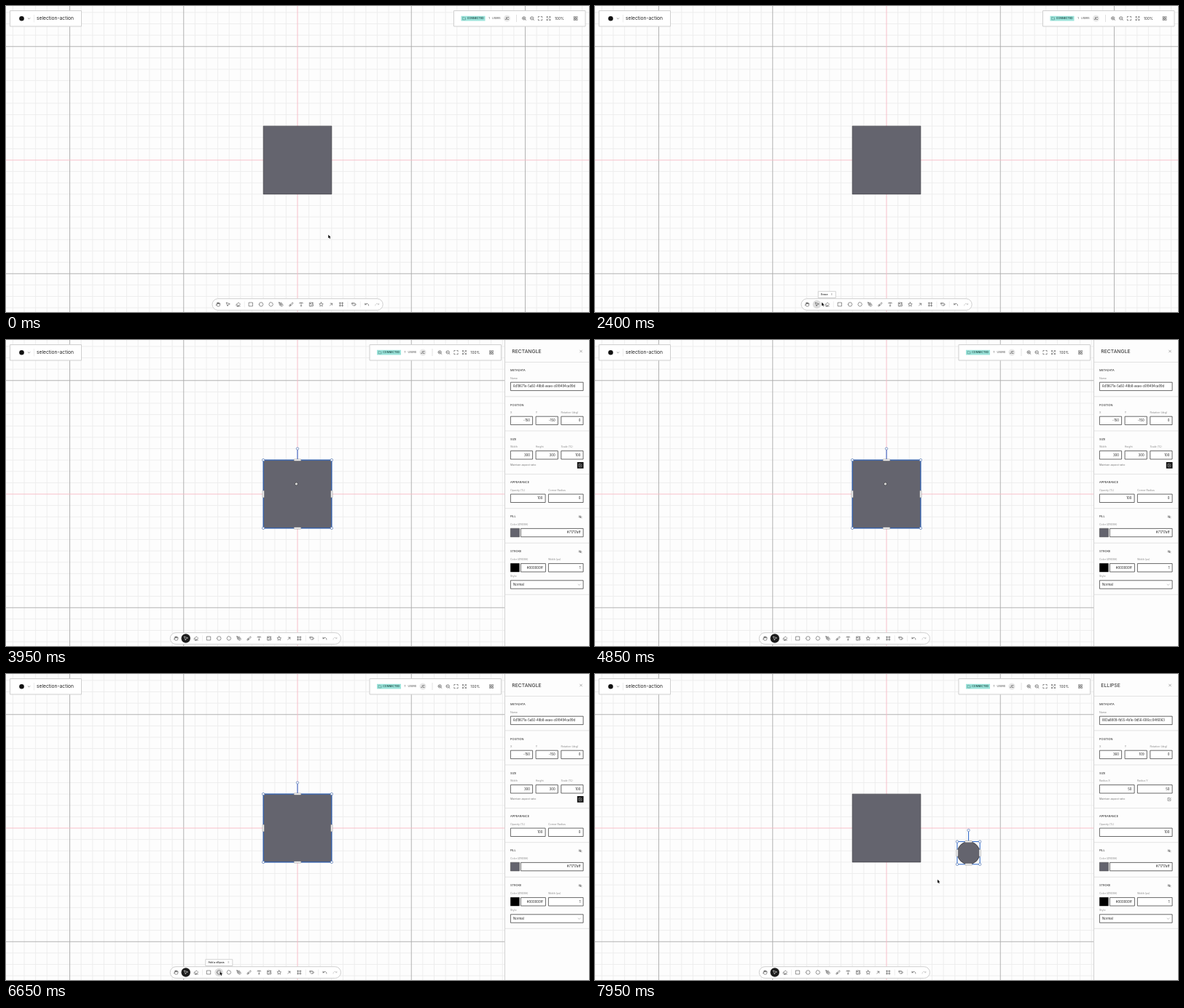
These frames come from a looping animation (800x421 px, 8000 ms). An HTML page with a canvas:

```html
<!DOCTYPE html>
<html lang="en">
<head>
<meta charset="utf-8">
<title>Selection action</title>
<style>
html, body { margin: 0; width: 100%; height: 100%; overflow: hidden; background: #fdfdfd; }
canvas { display: block; width: 800px; height: 421px; }
</style>
</head>
<body>
<canvas id="stage"></canvas>
<script>
const W = 800, H = 421, LOOP = 8000, STEP = 50;
const CX = 400, CY = 212, UNIT = 0.3125, PANEL_W = 115.5;
const FILL = '#64646e', BLUE = '#2563c9', INK = '#333', BORDER = '#cfcfcf';

const canvas = document.getElementById('stage');
const ctx = canvas.getContext('2d');
const dpr = window.devicePixelRatio || 1;
canvas.width = W * dpr;
canvas.height = H * dpr;

// Moments at which the interface changes
const PICK_SELECT = 2750, SELECT_RECT = 3600, PICK_ELLIPSE = 6700, PLACE = 7400;

// Pointer stops: time, x, y
const stops = [
  [50, 442.3, 314.8], [750, 437, 284], [900, 437, 284], [1250, 412.6, 216.6],
  [1700, 412.6, 216.6], [2350, 317, 409], [2400, 311.2, 407.8], [2500, 304, 410],
  [2750, 304, 410], [3400, 398.4, 198], [5700, 398.4, 198], [6400, 293.6, 409.6],
  [6700, 293.6, 409.6], [7200, 512.5, 246], [7400, 512.5, 246], [7950, 470, 282.8]
];

// Icons on a 24 unit grid
const ring = (x, y, r) => `M${x - r} ${y}a${r} ${r} 0 1 0 ${2 * r} 0a${r} ${r} 0 1 0 ${-2 * r} 0`;
const corners = 'M8 3H3v5M16 3h5v5M3 16v5h5M21 16v5h-5';
const lens = ring(11, 11, 8) + 'M21 21l-4.3-4.3M8 11h6';
const shapes = {
  hand: 'M18 11V6a2 2 0 0 0-4 0v4V4a2 2 0 0 0-4 0v6.500V6a2 2 0 0 0-4 0v8M18 8a2 2 0 1 1 4 0v6a8 8 0 0 1-8 8h-2c-3 0-4.500-1-6-2.300l-3.600-3.600a2 2 0 0 1 2.800-2.800L7 15',
  pointer: 'M4 4l6.500 17 3-7.500L21 10.500z',
  eraser: 'M7 21l-4.300-4.300q-1.600-1.700 0-3.400l9.600-9.600q1.700-1.600 3.400 0l5.600 5.600q1.600 1.700 0 3.400L13 21zM5 11l9 9M7 21h15',
  square: 'M3 3h18v18H3z',
  circle: ring(12, 12, 10),
  hexagon: 'M12 2l7 3 3 7-3 7-7 3-7-3-3-7 3-7z',
  pen: 'M15 22l-3-3 7-7 3 3zM18 13L16.500 5.500 2 2l3.500 14.500L13 18M2 2l7.500 7.500' + ring(11, 11, 2),
  brush: 'M9 12l8-8a2.800 2.800 0 1 1 4 4l-8 8zM7 15c-1.700 0-3 1.300-3 3 0 1.300-2.500 1.500-2 2 4 4 8 1 8-2a3 3 0 0 0-3-3z',
  type: 'M4 7V4h16v3M9 20h6M12 4v16',
  image: 'M14 3H3v18h18V11M16 5.500h6M19 2.500v6M21 16l-4-4-9 9' + ring(9, 9, 2),
  star: 'M12 2l3 6.500 7 1-5 5 1.200 7L12 18l-6.200 3.500 1.200-7-5-5 7-1z',
  arrow: 'M6 18L17 7M8 7h9v9',
  frame: 'M2 6h20M2 18h20M6 2v20M18 2v20',
  tags: 'M2 5h9l6 7-5 6H8L2 12zM14 5l8 7-7 8' + ring(6.5, 9, 1),
  undo: 'M3 7v6h6M21 18a9 9 0 0 0-15-7.700L3 13',
  redo: 'M21 7v6h-6M3 18a9 9 0 0 1 15-7.700L21 13',
  zoomIn: lens + 'M11 8v6',
  zoomOut: lens,
  full: corners,
  fit: corners + 'M3 3l6 6M21 3l-6 6M3 21l6-6M21 21l-6-6',
  panel: corners + 'M8 8h8v8H8zM3 12h5M16 12h5M12 3v5M12 16v5',
  folder: 'M2 20V4h7l3 3h10v13z',
  eyeOff: 'M2 12q10-14 20 0q-10 14-20 0M3 3l18 18' + ring(12, 12, 3),
  check: 'M20 12v9H3V4h11M8 11l4 4 9-11',
  close: 'M5 5l14 14M19 5L5 19',
  down: 'M5 9l7 7 7-7'
};
const icons = Object.fromEntries(Object.entries(shapes).map(([k, d]) => [k, new Path2D(d)]));

const tools = [
  ['hand', 291], ['pointer', 304.5], ['eraser', 318.5], ['square', 336], ['circle', 350],
  ['hexagon', 363.6], ['pen', 377.3], ['brush', 391.2], ['type', 405], ['image', 418.8],
  ['star', 432.5], ['arrow', 446.2], ['frame', 460], ['tags', 477.6], ['undo', 495.2], ['redo', 509.2]
];

const clamp = v => Math.max(0, Math.min(1, v));
const smooth = v => v * v * (3 - 2 * v);
const easeOut = v => 1 - (1 - v) ** 3;

function pointerAt(t) {
  const i = stops.findIndex(s => s[0] > t);
  if (i === 0) return stops[0].slice(1);
  if (i < 0) return stops[stops.length - 1].slice(1);
  const [t0, x0, y0] = stops[i - 1], [t1, x1, y1] = stops[i];
  const k = smooth((t - t0) / (t1 - t0));
  return [x0 + (x1 - x0) * k, y0 + (y1 - y0) * k];
}

function text(s, x, y, size, color = '#222', align = 'left', weight = 400) {
  ctx.font = `${weight} ${size}px Inter, sans-serif`;
  ctx.fillStyle = color;
  ctx.textAlign = align;
  ctx.textBaseline = 'middle';
  ctx.fillText(s, x, y);
}

function line(x0, y0, x1, y1, color, width = 1) {
  ctx.strokeStyle = color;
  ctx.lineWidth = width;
  ctx.beginPath();
  ctx.moveTo(x0, y0);
  ctx.lineTo(x1, y1);
  ctx.stroke();
}

function paint(fill, stroke, width) {
  if (fill) { ctx.fillStyle = fill; ctx.fill(); }
  if (stroke) { ctx.strokeStyle = stroke; ctx.lineWidth = width; ctx.stroke(); }
}

function box(x, y, w, h, fill, stroke, width = 1, r = 0) {
  ctx.beginPath();
  ctx.roundRect(x, y, w, h, r);
  paint(fill, stroke, width);
}

function disc(x, y, r, fill, stroke, width = 1) {
  ctx.beginPath();
  ctx.arc(x, y, r, 0, 2 * Math.PI);
  paint(fill, stroke, width);
}

function icon(name, x, y, size = 6.6, color = INK, width = 1.9) {
  ctx.save();
  ctx.translate(x - size / 2, y - size / 2);
  ctx.scale(size / 24, size / 24);
  ctx.strokeStyle = color;
  ctx.lineWidth = width;
  ctx.lineCap = ctx.lineJoin = 'round';
  ctx.stroke(icons[name]);
  ctx.restore();
}

function grid() {
  ctx.fillStyle = '#fdfdfd';
  ctx.fillRect(0, 0, W, H);
  const rule = (n, color) => {
    const x = CX + n * 50 * UNIT, y = CY + n * 50 * UNIT;
    line(x, 0, x, H, color, 0.9);
    line(0, y, W, y, color, 0.9);
  };
  for (let n = -26; n <= 26; n++) if (n % 10) rule(n, '#ededed');
  for (let n = -20; n <= 20; n += 10) if (n) rule(n, '#ababab');
  rule(0, '#f8b9c3');
}

function selection(x, y, r) {
  box(x - r, y - r, 2 * r, 2 * r, null, BLUE, 1);
  line(x, y - r, x, y - r - 14, BLUE, 1);
  const knob = (kx, ky) => disc(kx, ky, 1.7, '#fff', '#5276b4', 0.7);
  knob(x, y - r - 15.6);
  for (const s of [-1, 1]) {
    box(x - 5, y + s * r - 1.1, 10, 2.2, '#fff', '#777', 0.5, 1);
    box(x + s * r - 1.1, y - 5, 2.2, 10, '#fff', '#777', 0.5, 1);
    knob(x - r, y + s * r);
    knob(x + r, y + s * r);
  }
}

function scene(t) {
  grid();
  const r = 150 * UNIT;
  box(CX - r, CY - r, 2 * r, 2 * r, FILL, '#35353d', 0.6);
  if (t >= SELECT_RECT && t < PICK_ELLIPSE) selection(CX, CY, r);
  if (t >= PLACE) {
    disc(512.6, 246.2, 15.6, FILL, '#222', 0.6);
    selection(512.6, 246.2, 15.6);
  }
}

function header(shift) {
  box(5.5, 6.5, 98, 21.500, '#fff', BORDER);
  disc(21.5, 17.200, 3.3, '#111');
  icon('down', 31.5, 17.2, 4.5, '#222', 2.4);
  line(38.5, 12, 38.5, 22.5, '#e3e3e3', 0.6);
  text('selection-action', 42, 17.4, 6.7);

  ctx.save();
  ctx.translate(-shift, 0);
  box(614.5, 6.5, 180.5, 21.5, '#fff', BORDER);
  box(624.5, 13.800, 33, 6.600, '#9be3da');
  icon('folder', 628.6, 17, 4.6, '#2a5c57');
  text('CONNECTED', 632.7, 17.2, 3.65, '#17403c', 'left', 500);
  text('1', 662.2, 17.2, 3.7, '#444');
  text('USERS', 667, 17.2, 3.55, '#444');
  disc(687.5, 17.1, 4.6, '#e9e9e9');
  text('JC', 687.5, 17.3, 4.8, '#333', 'center');
  line(700.5, 12, 700.5, 22, '#d5d5d5', 0.7);
  icon('zoomIn', 711, 17.1);
  icon('zoomOut', 722, 17.1);
  icon('full', 733, 17.1, 7);
  icon('fit', 744.5, 17.1, 6.4);
  text('100%', 753, 17.3, 4.8, '#333');
  icon('panel', 781.600, 17.1, 6.6);
  ctx.restore();
}

function toolbar(t, shift, px, py) {
  const active = t < PICK_SELECT ? -1 : t >= PICK_ELLIPSE && t < PLACE ? 4 : 1;
  ctx.save();
  ctx.translate(-shift / 2, 0);
  box(283, 402.7, 234.2, 15.8, '#fff', BORDER, 1, 7.9);
  for (const x of [327.3, 469, 486.3]) line(x, 406.5, x, 414.5, '#e2e2e2', 0.6);
  tools.forEach(([name, x], i) => {
    const hover = Math.abs(px + shift / 2 - x) < 6.9 && Math.abs(py - 410.5) < 6.5;
    if (i === active) disc(x, 410.5, 6.2, '#1c1c1c');
    else if (hover) disc(x, 410.5, 5.8, '#dedede');
    icon(name, x, 410.5, 6.6, i === active ? '#fff' : name === 'redo' ? '#b0b0b0' : INK);
  });
  ctx.restore();
}

function tooltip(x, w, label, key) {
  box(x, 392.7, w, 8.8, '#fff', '#c8c8c8', 0.8);
  text(label, x + 3.8, 397.2, 3.5, '#222', 'left', 500);
  text(key, x + w - 5.2, 397.2, 3.4, '#888', 'center');
}

function tips(t) {
  if (t >= 2350 && t < 2550) tooltip(306.3, 24, 'Erase', 'E');
  if (t >= 2550 && t < 2800) tooltip(289, 31, 'Selection', 'S');
  if (t >= 6450 && t < PICK_ELLIPSE) tooltip(273.800, 37, 'Add a ellipsis', 'E');
}

function heading(s, y, divider, eye) {
  text(s, 692, y, 3.9, '#222');
  if (eye) icon('eyeOff', 788, y, 5, '#444');
  line(684.5, divider, W, divider, '#dcdcdc', 0.8);
}

function field(x, y, w, value, label) {
  if (label) text(label, x, y - 5, 3.55, '#8c8c8c');
  box(x + 0.4, y + 0.4, w - 0.8, 11.400, '#fff', '#444', 0.8);
  text(value, x + w - 4, y + 6.2, 4.3, '#222', 'right');
}

function panel(t, open) {
  if (!open) return;
  const ellipse = t >= PICK_ELLIPSE, placed = t >= PLACE;
  const name = placed ? '883a8809-fb55-4b1e-9d56-606cc04f6063'
    : ellipse ? '' : '6d19671e-5a92-48b8-aeae-c6f8494ca99d';
  const [x, y] = placed ? ['360', '109'] : ellipse ? ['0', '0'] : ['-150', '-150'];
  const half = 48.5, third = 31;

  ctx.save();
  ctx.translate(PANEL_W * (1 - open), 0);
  box(684.5, -1, 117, H + 2, '#fdfdfd', '#cfcfcf', 0.9);
  text(ellipse ? 'ELLIPSE' : 'RECTANGLE', 694.3, 15.8, 6.85);
  icon('close', 789, 15.5, 5, '#444');
  line(684.5, 30.500, W, 30.5, '#dcdcdc', 0.8);

  heading('METADATA', 42.2, 77.8);
  field(692, 57.8, 100.5, '', 'Name');
  text(name, 696, 64, 4.15);

  heading('POSITION', 89.4, 125);
  field(692, 104.8, third, x, 'X');
  field(726.7, 104.8, third, y, 'Y');
  field(761.4, 104.8, third, '0', 'Rotation (deg)');

  heading('SIZE', 136.6, 184.6);
  if (ellipse) {
    field(692, 152.2, half, '50', 'Radius X');
    field(744, 152.2, half, '50', 'Radius Y');
  } else {
    field(692, 152.2, third, '300', 'Width');
    field(726.7, 152.2, third, '300', 'Height');
    field(761.4, 152.2, third, '100', 'Scale (%)');
  }
  text('Maintain aspect ratio', 692, 172.3, 3.6, '#777');
  if (!ellipse) box(783.8, 168, 8.7, 8.7, '#111');
  icon('check', 788.1, 172.3, 5.6, ellipse ? '#333' : '#fff');

  heading('APPEARANCE', 196.2, 231.700);
  field(692, 211.7, ellipse ? 100.5 : half, '100', 'Opacity (%)');
  if (!ellipse) field(744, 211.7, half, '0', 'Corner Radius');

  heading('FILL', 243.3, 279.3, true);
  text('Color (#RGBA)', 692, 254.2, 3.55, '#8c8c8c');
  box(692.3, 259.2, 12.2, 11.8, FILL, '#444', 0.5);
  field(706, 259, 86.5, '#71717aff');

  heading('STROKE', 291.2, 350.2, true);
  text('Color (#RGBA)', 692, 302.4, 3.55, '#8c8c8c');
  box(692.2, 307.2, 12.4, 12, '#000');
  field(706, 307.2, 34.8, '#000000ff');
  field(744, 307.2, half, '1', 'Width (px)');
  field(692, 330.4, 100.5, '', 'Style');
  text('Normal', 696, 336.6, 4.3);
  icon('down', 786.5, 336.6, 4.8, '#666');
  ctx.restore();
}

const arrowShape = new Path2D('M0 0v4.700l1.100-1 .8 1.700 .8-.3-.8-1.700h1.500z');

function pointer(t, x, y) {
  const overRect = Math.abs(x - CX) < 47 && Math.abs(y - CY) < 47;
  const overEllipse = Math.hypot(x - 512.6, y - 246.2) < 15.6;
  const creating = t >= PICK_ELLIPSE && t < PLACE && y < 402;
  const grab = t >= PLACE ? overEllipse : t >= SELECT_RECT && t < PICK_ELLIPSE && overRect;
  if (creating) {
    line(x - 3, y, x + 3, y, '#222', 0.7);
    line(x, y - 3, x, y + 3, '#222', 0.7);
  } else if (grab) {
    disc(x, y, 1.9, '#fff', '#222', 0.6);
    line(x - 0.8, y - 0.8, x + 0.8, y + 0.6, '#444', 0.5);
  } else {
    ctx.save();
    ctx.translate(x, y);
    ctx.lineJoin = 'round';
    ctx.strokeStyle = '#fff';
    ctx.lineWidth = 0.9;
    ctx.stroke(arrowShape);
    ctx.fillStyle = '#000';
    ctx.fill(arrowShape);
    ctx.restore();
  }
}

function draw(t) {
  const [px, py] = pointerAt(t);
  const open = easeOut(clamp((t - SELECT_RECT + STEP) / 350));
  const shift = PANEL_W * open;
  ctx.setTransform(dpr, 0, 0, dpr, 0, 0);
  scene(t);
  header(shift);
  toolbar(t, shift, px, py);
  tips(t);
  panel(t, open);
  pointer(t, px, py);
}

const start = performance.now();
function tick(now) {
  const t = Math.max(0, now - start) % LOOP;
  draw(Math.floor(t / STEP) * STEP);
  requestAnimationFrame(tick);
}
draw(0);
requestAnimationFrame(tick);
</script>
</body>
</html>
```
